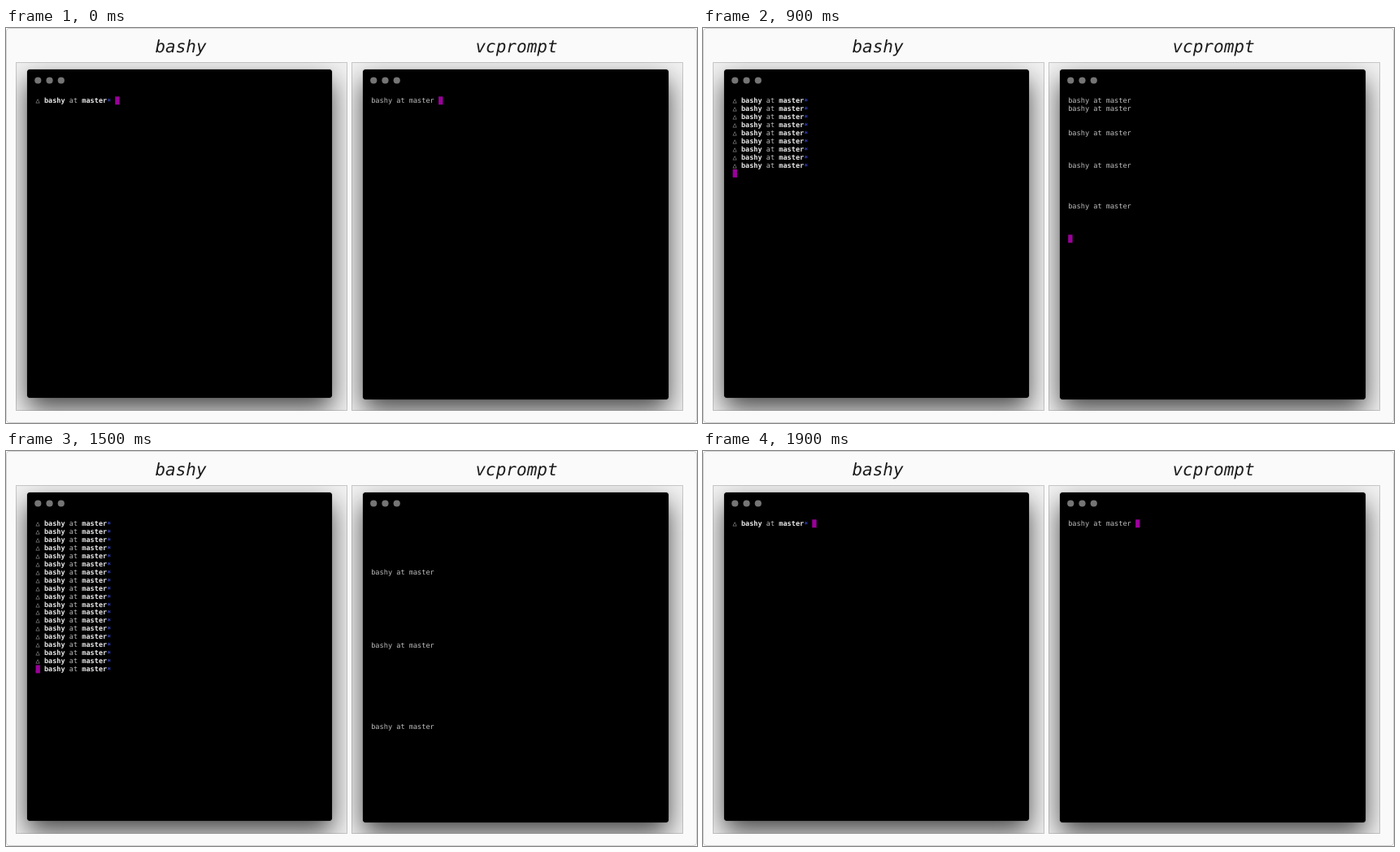
An HTML page that plays this animation: 850x486 px, repeating every 2000 ms.

```html
<!DOCTYPE html>
<html lang="en">
<head>
<meta charset="utf-8">
<title>Prompt speed comparison</title>
<style>
  html, body { margin: 0; width: 100%; height: 100%; overflow: hidden; background: #fff; }
  .stage {
    position: absolute; left: 0; top: 0; width: 850px; height: 486px; box-sizing: border-box;
    background: #fafafa; border: 1px solid #d2d2d2; border-radius: 4px;
  }
  .panel {
    position: absolute; top: 42px; width: 408px; height: 429px; box-sizing: border-box;
    overflow: hidden; background: #f2f2f2;
  }
  .panel::after {
    content: ""; position: absolute; inset: 0; border: 1px solid rgba(120, 120, 120, .35);
  }
  .window {
    position: absolute; left: 14px; top: 9px; background: #000; border-radius: 4px;
    box-shadow: 0 14px 32px rgba(0, 0, 0, .7), 0 0 1px #000;
  }
  .left { left: 12px; }
  .left .window { width: 375px; height: 404px; }
  .right { left: 425px; }
  .right .window { width: 376px; height: 406px; }
  svg { position: absolute; left: 0; top: 0; }
  text {
    font-family: "DejaVu Sans Mono", monospace; white-space: pre;
    text-rendering: geometricPrecision;
  }
  .title { font-size: 21px; font-style: oblique; fill: #1c1c1c; text-anchor: middle; }
  .row { fill: #bdbdbd; }
  #leftRows { font-size: 8.57px; }
  #rightRows { font-size: 8.6px; }
  .bold { font-weight: bold; fill: #e8e8e8; }
  .star { font-weight: bold; fill: #2f3fb4; }
  .cursor { fill: #9b009b; }
  .dot { fill: #757575; }
</style>
</head>
<body>
<div class="stage"></div>
<div class="panel left"><div class="window"></div></div>
<div class="panel right"><div class="window"></div></div>
<svg width="850" height="486" viewBox="0 0 850 486">
  <text class="title" x="215" y="29.5">bashy</text>
  <text class="title" x="628" y="29.5">vcprompt</text>
  <g id="dots"></g>
  <g id="leftRows"></g>
  <g id="rightRows"></g>
  <rect id="leftCursor" class="cursor" width="5.3" height="10"/>
  <rect id="rightCursor" class="cursor" width="5.3" height="10"/>
</svg>
<script>
const LOOP = 2000, STEP = 100, BASELINE = 92, BOTTOM_ROW = 35;
const left = { x: 36.6, pitch: 9.95, cell: 5.14, promptEnd: 19 };
const right = { x: 449.2, pitch: 10, cell: 5.18, promptEnd: 16 };
const byId = id => document.getElementById(id);

function add(parent, tag, attrs, content = "") {
  const node = document.createElementNS("http://www.w3.org/2000/svg", tag);
  for (const name in attrs) node.setAttribute(name, attrs[name]);
  node.innerHTML = content;
  return parent.appendChild(node);
}

for (const x of [39.3, 452.2])
  for (let i = 0; i < 3; i++)
    add(byId("dots"), "circle", { class: "dot", cx: x + i * 14.25, cy: 64.5, r: 4.1 });

const leftPrompt = '△ <tspan class="bold">bashy</tspan> at <tspan class="bold">master</tspan>' +
  '<tspan class="star" dy="1">*</tspan>';
const leftRows = Array.from({ length: 23 }, (_, i) =>
  add(byId("leftRows"), "text", { class: "row", x: left.x, y: BASELINE + i * left.pitch }, leftPrompt));
const rightRows = Array.from({ length: 13 }, () =>
  add(byId("rightRows"), "text", { class: "row", x: right.x }, "bashy at master"));

// Each slower prompt leaves one more blank line than the one before it.
const promptLine = k => Math.max(0, (k * k + 3 * k - 2) / 2);

// One entry per step: prompts printed, and the line the cursor is on.
const leftCount = [1, 1, 1, 2, 2, 2, 4, 6, 8, 9, 11, 13, 14, 16, 17, 19, 20, 22, 23, 1];
const leftLine  = [0, 0, 0, 1, 1, 1, 3, 5, 8, 9, 10, 13, 14, 15, 17, 18, 20, 22, 22, 0];
const rightCount = [1, 1, 1, 2, 2, 2, 3, 4, 4, 5, 6, 6, 7, 8, 9, 10, 11, 12, 12, 1];
const rightLine  = [0, 0, 0, 1, 1, 1, 4, 9, 12, 17, 21, 26, 33, 40, 52, 63, 70, 76, 85, 0];

const show = (node, visible) => node.setAttribute("visibility", visible ? "visible" : "hidden");

function placeCursor(node, pane, row, idle) {
  node.setAttribute("x", pane.x + (idle ? pane.promptEnd * pane.cell : 0));
  node.setAttribute("y", 84.3 + row * pane.pitch);
}

let shown = -1;
function draw(time) {
  const step = Math.floor((time % LOOP) / STEP);
  if (step !== shown) {
    shown = step;
    const idle = step < 6 || step === 19;
    leftRows.forEach((row, i) => show(row, i < leftCount[step]));
    placeCursor(byId("leftCursor"), left, leftLine[step], idle);

    const scroll = Math.max(0, rightLine[step] - BOTTOM_ROW);
    rightRows.forEach((row, k) => {
      const line = promptLine(k) - scroll;
      row.setAttribute("y", BASELINE + line * right.pitch);
      show(row, k < rightCount[step] && line >= 0);
    });
    placeCursor(byId("rightCursor"), right, rightLine[step] - scroll, idle);
    show(byId("rightCursor"), step !== 15);
  }
  requestAnimationFrame(tick);
}

const start = performance.now();
function tick() { draw(performance.now() - start); }
tick();
</script>
</body>
</html>
```
